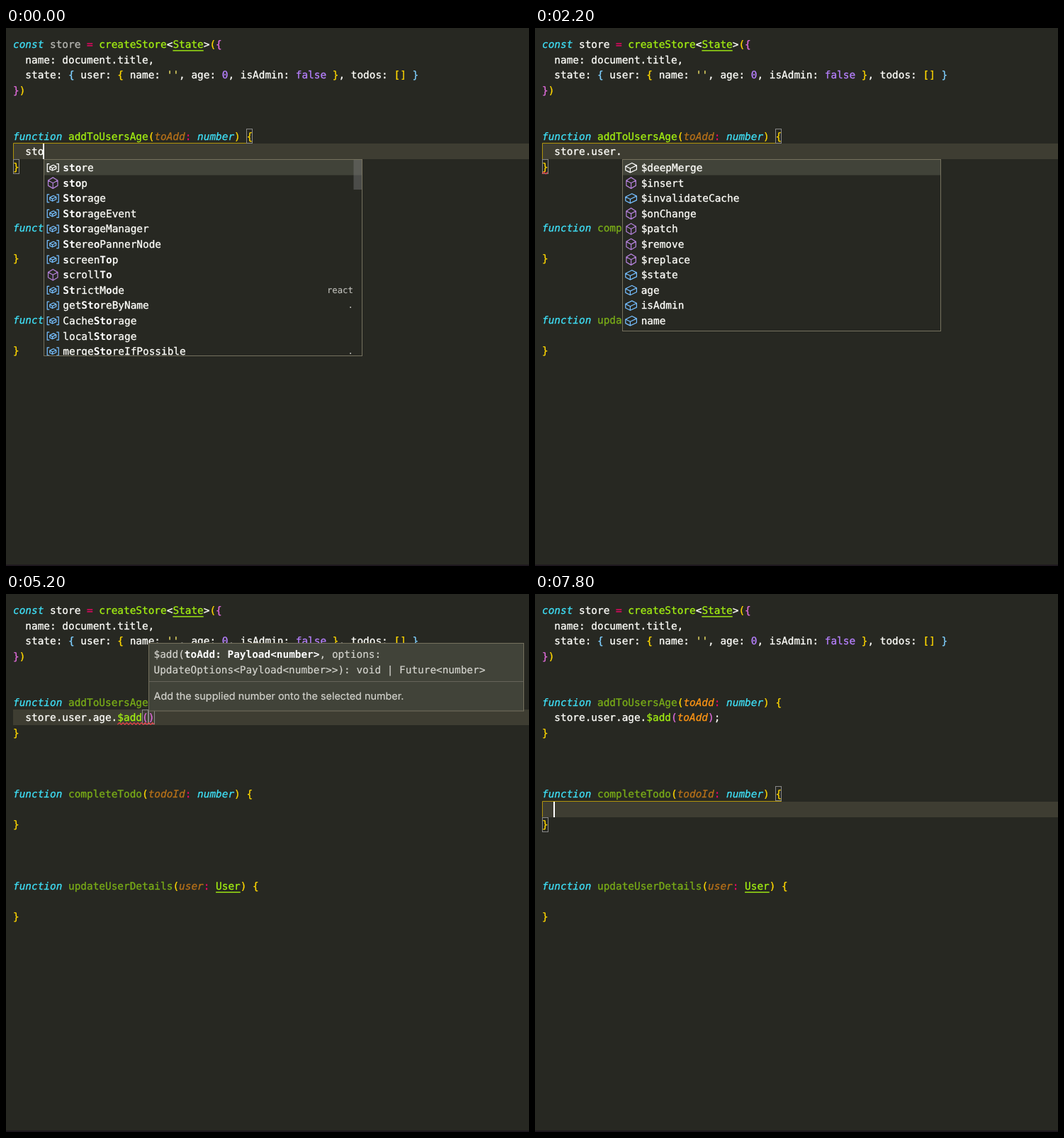
These frames come from a looping animation (738 by 759 pixels, 8 s). An HTML page:

```html
<!DOCTYPE html>
<html lang="en">
<head>
<meta charset="utf-8">
<title>Store autocomplete</title>
<style>
  html, body { margin: 0; width: 100%; height: 100%; overflow: hidden; background: #272822; }
  svg { display: block; color: #fdfdf9; }
  text { font: 14.4px "DejaVu Sans Mono", monospace; white-space: pre; text-rendering: geometricPrecision;
    fill: currentColor; stroke: currentColor; stroke-width: .3; }
  .keyword, .param { font-style: italic; }
  .keyword { color: #3fdff6; }
  .param { color: #ff9514; }
  .func, .type { color: #a2ee12; }
  .underline { fill: currentColor; }
  .op { color: #f50468; }
  .num { color: #b780ff; }
  .str { color: #ecdf66; }
  .gold { color: #ffd700; }
  .orchid { color: #e06cdc; }
  .sky { color: #7fcfff; }
  .dim { opacity: .667; }
  .bold { font-weight: bold; color: #fff; stroke: none; }
  .hint { color: #d6d6d0; stroke-width: .15; }
  .detail { font-size: 12.24px; text-anchor: end; color: #bdbdb8; stroke-width: .15; }
  .prose { font: 14.4px Inter, sans-serif; color: #d6d6d0; stroke-width: .15; }
  .panel { stroke: #75715e; }
  .box { fill: none; stroke: #888; }
  .guide { fill: none; stroke: #b0940c; }
  .icon { fill: none; stroke-width: 1.25; stroke-linejoin: round; }
  .squiggle { fill: none; stroke: #f0404a; stroke-width: 1.2; }
</style>
</head>
<body>
<svg id="stage" width="738" height="759" viewBox="0 0 738 759"></svg>
<script>
const LOOP = 8000, CHAR = 8.669, ROW = 21.6, LEFT = 10, TOP = 12.2, BASE = 15.7;
const POPUP_W = 449, HINT_W = 529;
const colX = col => LEFT + col * CHAR;
const rowY = row => TOP + row * ROW;
const crisp = v => Math.round(v) + .5;

// First letter of each item is its icon: v variable, m method, f field.
const GLOBALS = ['vstore', 'mstop', 'vStorage', 'vStorageEvent', 'vStorageManager', 'vStereoPannerNode',
  'vscreenTop', 'mscrollTo', 'vStrictMode react', 'vgetStoreByName .', 'vCacheStorage', 'vlocalStorage',
  'vmergeStoreIfPossible .'];
const STORE_KEYS = ['f$deepMerge', 'f$detachStore', 'm$insert', 'f$invalidateCache', 'm$onChange', 'm$patch',
  'm$replace', 'f$state', 'ftodos', 'fuser'];
const USER_KEYS = ['f$deepMerge', 'm$insert', 'f$invalidateCache', 'm$onChange', 'm$patch', 'm$remove',
  'm$replace', 'f$state', 'fage', 'fisAdmin', 'fname'];
const AGE_KEYS = ['m$add', 'f$invalidateCache', 'm$onChange', 'm$remove', 'm$replace', 'f$state', 'm$subtract'];
const ARG_KEYS = ['vtoAdd', 'vtop', 'vtoolbar', 'vToggleEvent', 'vTouch', 'vTouchEvent', 'vTouchList', 'vText',
  'vTextDecoder', 'vTextEncoder', 'vTextEvent', 'vTextMetrics', 'vTimeRanges'];

const ADD_PAIR = [[6, 38], [8, 0]], TODO_PAIR = [[12, 38], [14, 0]];
const argPair = length => [[7, 21], [7, 22 + length]];
const CALL = 'store.user.age.$add';

// Each step overrides part of the state left by the step before it.
const steps = [
  [0, { code: 'sto', back: 0, caret: true, row: 7, col: null, list: GLOBALS, query: 'sto', sel: 0,
    boxes: ADD_PAIR, guide: 7, hint: false, storeUsed: false, addDim: false, argUsed: false,
    broken: false, callError: false }],
  [200, { code: 'stor', query: 'stor' }],
  [400, { code: 'store', query: 'store' }],
  [600, { list: null, storeUsed: true }],
  [800, { code: 'store.', broken: true }],
  [1000, { list: STORE_KEYS, query: '', sel: 9 }],
  [1600, { code: 'store.user', list: null }],
  [1800, { code: 'store.user.' }],
  [2000, { list: USER_KEYS, sel: 0 }],
  [2200, { caret: false }],
  [2600, { code: 'store.user.a', caret: true, list: ['fage', 'fisAdmin'], query: 'a' }],
  [2800, { code: 'store.user.ag', list: ['fage'], query: 'ag' }],
  [3000, { code: 'store.user.age', list: null }],
  [3400, { code: 'store.user.age.', list: AGE_KEYS, query: '' }],
  [3800, { caret: false }],
  [4000, { addDim: true }],
  [4200, { caret: true }],
  [4600, { code: CALL, list: null }],
  [4800, { code: CALL + '()', back: 1, broken: false, boxes: argPair(0), guide: null }],
  [5000, { hint: true, callError: true }],
  [5200, { caret: false }],
  [5600, { code: CALL + '(t)', caret: true, list: ARG_KEYS, query: 't', boxes: argPair(1) }],
  [5800, { code: CALL + '(to)', query: 'to', boxes: argPair(2) }],
  [6000, { code: CALL + '(toAdd)', list: null, argUsed: true, boxes: argPair(5) }],
  [6200, { callError: false }],
  [6400, { back: 0, hint: false }],
  [6600, { code: CALL + '(toAdd);', boxes: ADD_PAIR, guide: 7 }],
  [6800, { row: 8, col: 1, guide: null }],
  [7000, { row: 9, col: 0 }],
  [7200, { row: 10, boxes: [] }],
  [7400, { row: 11 }],
  [7600, { row: 12 }],
  [7800, { row: 13, col: 2, boxes: TODO_PAIR, guide: 13 }],
];

let last = {};
const states = steps.map(([at, change]) => last = { ...last, ...change, at });

const escape = s => s.replace(/&/g, '&amp;').replace(/</g, '&lt;');
const text = (x, y, s, cls = '') => `<text x="${x}" y="${y}" class="${cls}">${escape(s)}</text>`;
const rect = (x, y, w, h, attrs) => `<rect x="${x}" y="${y}" width="${w}" height="${h}" ${attrs}/>`;

// Tokens are [text, class] pairs laid out on the character grid.
function line(row, tokens, start = 0) {
  let col = start, out = '';
  for (const [s, cls = ''] of tokens) {
    out += text(colX(col), rowY(row) + BASE, s, cls);
    if (cls === 'type') out += rect(colX(col), rowY(row) + 19, s.length * CHAR, 1.4, 'class="type underline"');
    col += s.length;
  }
  return out;
}

function signature(row, name, param, type, typeClass, nameDim, paramDim) {
  return line(row, [['function', 'keyword'], [' '], [name, nameDim ? 'func dim' : 'func'], ['(', 'gold'],
    [param, paramDim ? 'param dim' : 'param'], [':', 'op'], [' '], [type, typeClass], [')', 'gold'],
    [' '], ['{', 'gold']]);
}

function program(s) {
  const call = (s.code.match(/\$add|toAdd|[()]|[^$()]+/g) || []).map(part => [part,
    part === '$add' ? 'func' : part === 'toAdd' ? 'param' : /[()]/.test(part) ? 'orchid' : '']);
  return line(0, [['const', 'keyword'], [' '], ['store', s.storeUsed ? '' : 'dim'], [' '], ['=', 'op'], [' '],
      ['createStore', 'func'], ['<'], ['State', 'type'], ['>'], ['(', 'gold'], ['{', 'orchid']]) +
    line(1, [['name: document.title,']], 2) +
    line(2, [['state: '], ['{', 'sky'], [' user: '], ['{', 'gold'], [' name: '], ["''", 'str'], [', age: '],
      ['0', 'num'], [', isAdmin: '], ['false', 'num'], [' '], ['}', 'gold'], [', todos: '], ['[]', 'gold'],
      [' '], ['}', 'sky']], 2) +
    line(3, [['}', 'orchid'], [')', 'gold']]) +
    signature(6, 'addToUsersAge', 'toAdd', 'number', 'keyword', s.addDim, !s.argUsed) +
    line(7, call, 2) +
    signature(12, 'completeTodo', 'todoId', 'number', 'keyword', true, true) +
    signature(18, 'updateUserDetails', 'user', 'User', 'type', true, true) +
    [8, 14, 20].map(row => line(row, [['}', 'gold']])).join('');
}

function squiggle(row, col, length) {
  const x0 = colX(col), y = rowY(row) + 19.5, count = Math.round(length * CHAR / 2.6);
  const points = Array.from({ length: count + 1 }, (_, i) => `${x0 + i * 2.6},${y + (i % 2 ? -1.3 : 1.3)}`);
  return `<polyline class="squiggle" points="${points.join(' ')}"/>`;
}

const BRICK = 'M-7.8-2.1L1.2-6.6 7.8-3.2V2.6L-1.2 6.8-7.8 3.5ZM-7.8-2.1L-1.2 1.2 7.8-3.2M-1.2 1.2V6.8';
const ICONS = {
  m: ['#b180d7', 'M0-7.8L6.7-3.7V3.7L0 7.7-6.7 3.7V-3.7ZM-6.7-3.7L0 0 6.7-3.7M0 0V7.7'],
  f: ['#75beff', BRICK],
  v: ['#75beff', 'M-5-5.5H-8V5.5H-5M5-5.5H8V5.5H5'],
};

function icon(kind, x, y, selected) {
  const [color, path] = ICONS[kind];
  const inner = kind === 'v' ? `<path d="${BRICK}" transform="scale(.58)" stroke-width="2.1"/>` : '';
  return `<g class="icon" stroke="${selected ? '#fff' : color}" transform="translate(${x} ${y})">` +
    `<path d="${path}"/>${inner}</g>`;
}

// Marks query letters in order; null when some are missing.
function fuzzy(label, query) {
  let next = 0;
  const hits = [...label].map(c => next < query.length && c.toLowerCase() === query[next] && !!++next);
  return next === query.length ? hits : null;
}

function label(x, y, name, hits) {
  let out = '', from = 0;
  for (let i = 1; i <= name.length; i++) {
    if (i < name.length && hits[i] === hits[from]) continue;
    out += text(x + from * CHAR, y, name.slice(from, i), hits[from] ? 'bold' : '');
    from = i;
  }
  return out;
}

function popup(s, x) {
  const left = crisp(x), y = crisp(rowY(8));
  const items = s.list.map(item => {
    const [name, detail = ''] = item.slice(1).split(' ');
    return { kind: item[0], name, detail, hits: fuzzy(name, s.query) };
  }).filter(item => item.hits);
  const height = Math.min(Math.round(items.length * ROW) + 4, 277);
  const rows = items.map((item, i) => {
    const top = y + .5 + i * ROW, selected = i === s.sel;
    return (selected ? rect(left, top, POPUP_W, ROW, 'fill="#414339"') : '') +
      icon(item.kind, x + 12.9, top + ROW / 2 + .3, selected) +
      label(x + 27, top + BASE + .2, item.name, item.hits) +
      (item.detail ? text(x + POPUP_W - 12.5, top + BASE - .7, item.detail, 'detail') : '');
  }).join('');
  const bar = items.length > 12
    ? rect(left + POPUP_W - 12, y + .5, 12, 42, 'fill="#797979" opacity=".45"') : '';
  const frame = attrs => rect(left, y, POPUP_W, height, attrs);
  return `<clipPath id="frame">${frame('')}</clipPath>` + frame('fill="#272822"') +
    `<g clip-path="url(#frame)">${rows}${bar}</g>` + frame('class="panel" fill="none"');
}

function parameterHint(caretX) {
  const x = crisp(Math.min(caretX, 738 - HINT_W - 1)), tx = x + 7;
  return rect(x, 69.5, HINT_W, 95.5, 'class="panel" fill="#414339"') +
    text(tx, 90.2, '$add(', 'hint') + text(tx + 5 * CHAR, 90.2, 'toAdd: Payload<number>', 'bold') +
    text(tx + 27 * CHAR, 90.2, ', options:', 'hint') +
    text(tx, 111.8, 'UpdateOptions<Payload<number>>): void | Future<number>', 'hint') +
    rect(x, 123, HINT_W, 1, 'fill="#66645a"') +
    text(tx, 149, 'Add the supplied number onto the selected number.', 'prose');
}

function scene(s) {
  const x = colX(s.col ?? s.code.length + 2 - s.back), y = Math.round(rowY(s.row));
  return rect(0, 0, 738, 759, 'fill="#272822"') + rect(0, 757, 738, 2, 'fill="#1e181e"') +
    rect(LEFT, y, 728, 22, 'fill="#3e3d32"') +
    (s.guide ? `<path class="guide" d="M348 ${crisp(rowY(s.guide)) - 1}H10.5V${rowY(s.guide + 1)}"/>` : '') +
    s.boxes.map(([r, c]) => rect(crisp(colX(c)), crisp(rowY(r)), 8, 20, 'class="box"')).join('') +
    program(s) +
    (s.broken ? squiggle(8, 0, 1) : '') +
    (s.callError ? squiggle(7, 17, s.code.length - 15) : '') +
    (s.caret ? rect(Math.max(LEFT, Math.round(x) - 1), y, 2, 22, 'fill="#fff"') : '') +
    (s.list ? popup(s, x) : '') +
    (s.hint ? parameterHint(x) : '');
}

const stage = document.getElementById('stage');
let shown = null;
function tick() {
  const time = performance.now() % LOOP;
  const state = states.findLast(s => s.at <= time);
  if (state !== shown) stage.innerHTML = scene(shown = state);
  requestAnimationFrame(tick);
}
tick();
</script>
</body>
</html>
```
